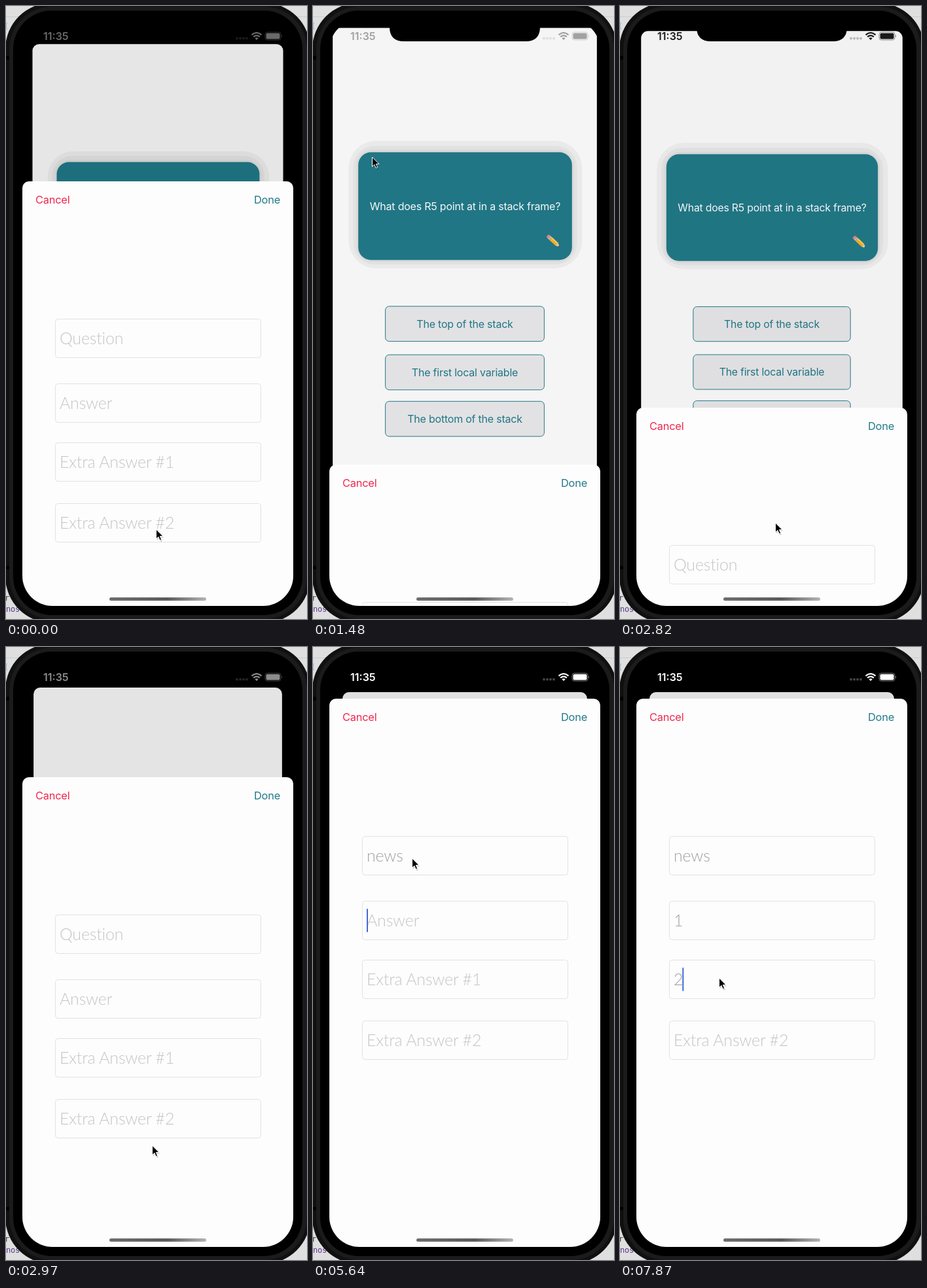
Animation of 460x937 px, one loop 8000 ms. Source, as an HTML page:

```html
<!DOCTYPE html>
<html lang="en">
<head>
<meta charset="utf-8">
<title>Flashcard form</title>
<style>
  html, body { margin: 0; width: 100%; height: 100%; overflow: hidden; background: #dfdfdf; }
  svg { display: block; width: 460px; height: 937px; }
  text { font: 16.4px Inter, "Liberation Sans", sans-serif; letter-spacing: -.22px; }
  .mid { text-anchor: middle; }
  .teal { fill: #217a89; }
  .option { fill: #e9e9eb; stroke: #217a89; }
  .box { fill: #fdfdfd; stroke: #e2e2e2; }
  .entry { font: 300 25px Lato, "Open Sans", sans-serif; letter-spacing: -.2px; }
  .code { font: 12px "DejaVu Sans Mono", monospace; }
  #clock { font-weight: 600; font-size: 16px; letter-spacing: 0; }
</style>
</head>
<body>
<svg viewBox="0 0 460 937">
  <defs>
    <clipPath id="screen"><rect x="25" y="21" width="414" height="896" rx="46"/></clipPath>
    <linearGradient id="bar">
      <stop offset="0" stop-color="#6e6e6e"/><stop offset=".6" stop-color="#5c5c5c"/><stop offset="1" stop-color="#b4b4b4"/>
    </linearGradient>
  </defs>

  <!-- desktop and device body -->
  <rect width="460" height="937" fill="#dfdfdf"/>
  <path d="M0 16.5H460" stroke="#cdcdcd"/>
  <text class="code" x="-3" y="35" fill="#8fb4dc">(</text>
  <text class="code" x="-2" y="909" fill="#444">r</text>
  <text class="code" x="0" y="926" fill="#5b3a8c">nos</text>
  <rect x="-1" y="-5" width="466" height="948" rx="71" fill="#101010"/>
  <rect x="5" y="1" width="455" height="936" rx="65" fill="#1b1b1b"/>
  <path d="M0 76h5v6H0zM0 856h5v5H0z"/>
  <rect x="11" y="7" width="442" height="924" rx="59"/>

  <g clip-path="url(#screen)">
    <g id="home">
      <rect x="25" y="21" width="414" height="896" rx="11" fill="#fdfdfd"/>
      <rect x="50" y="198" width="366" height="200" rx="43" fill="#f2f2f2"/>
      <rect x="57" y="206" width="351" height="186" rx="33" fill="#e9e9e9"/>
      <rect x="62" y="212" width="341" height="176" rx="25" fill="#e1e1e1"/>
      <rect class="teal" x="65" y="216" width="335" height="169" rx="20"/>
      <text class="mid" x="232.5" y="307" fill="#fff">What does R5 point at in a stack frame?</text>
      <g transform="translate(371 355.5) rotate(43)">
        <rect x="-13" y="-3" width="6" height="6" rx="2" fill="#ee8292"/>
        <rect x="-9" y="-3" width="3" height="6" fill="#b9bcc0"/>
        <rect x="-6" y="-3" width="13" height="6" fill="#f6b32c"/>
        <rect x="-6" y="-3" width="13" height="2" fill="#ffd355"/>
        <path d="M7-3 13 0 7 3z" fill="#f1cfa0"/>
        <path d="M11-1 13.500 0 11 1z" fill="#333"/>
      </g>
      <g id="options"></g>
      <path id="plus" d="M218 799.500H246M232 786V813" stroke="#217a89" stroke-width="5"/>
      <rect id="dim" x="25" y="21" width="414" height="896" rx="11"/>
    </g>
    <g id="sheet">
      <rect x="25" width="414" height="960" rx="10" fill="#fdfdfd"/>
      <text id="cancel" x="45" y="34" fill="#f0284f">Cancel</text>
      <text class="teal" x="419" y="34" text-anchor="end">Done</text>
      <g id="fields"></g>
      <rect id="caret" width="2" height="36" rx="1" fill="#4468d8"/>
    </g>
    <rect x="158" y="904" width="148" height="5" rx="2.500" fill="url(#bar)"/>
  </g>

  <path d="M109 20Q117 21 117 29V32Q117 54 139 54H325Q347 54 347 32V29Q347 21 355 20z"/>
  <g id="status">
    <text id="clock" x="57" y="52">11:35</text>
    <g opacity=".26">
      <circle cx="353" cy="49.500" r="2"/><circle cx="358" cy="49.500" r="2"/>
      <circle cx="363" cy="49.500" r="2"/><circle cx="368" cy="49.500" r="2"/>
    </g>
    <g fill="none" stroke="currentColor" stroke-width="2.300">
      <path d="M375.500 44.200Q383 37.500 390.500 44.200M378.200 47.200Q383 43 387.800 47.200"/>
    </g>
    <path d="M380.300 49.300Q383 47 385.700 49.300L383 52z"/>
    <rect x="396" y="40" width="24" height="12" rx="3.500" fill="none" stroke="currentColor" opacity=".45"/>
    <rect x="397.500" y="41.500" width="21" height="9" rx="2"/>
    <path d="M421 44q2 2 0 4z" opacity=".5"/>
  </g>

  <g id="cursor">
    <path d="M1.500 3V17.500L5 14.500 7.500 20 10 19 7.800 13.500H12.500z" opacity=".18"/>
    <path d="M.5 1V15.500L3.900 12.400 6.200 17.700 8.600 16.700 6.400 11.500H11z" stroke="#fff"/>
  </g>
</svg>

<script>
  const LOOP = 8000, STEP = 4000 / 27;
  const $ = id => document.getElementById(id);

  function add(parent, tag, attrs, text = '') {
    const el = document.createElementNS('http://www.w3.org/2000/svg', tag);
    for (const name in attrs) el.setAttribute(name, attrs[name]);
    el.textContent = text;
    return parent.appendChild(el);
  }

  [['The top of the stack', 457], ['The first local variable', 533], ['The bottom of the stack', 606]]
    .forEach(([label, y]) => {
      add($('options'), 'rect', { class: 'option', x: 107.5, y: y + .5, width: 249, height: 55, rx: 6 });
      add($('options'), 'text', { class: 'mid teal', x: 232, y: y + 34 }, label);
    });

  // typed: [step, value] pairs
  const fields = [
    { hint: 'Question', y: 210, typed: [[32, 'n'], [33, 'ne'], [34, 'new'], [36, 'news']] },
    { hint: 'Answer', y: 309, typed: [[45, '1']] },
    { hint: 'Extra Answer #1', y: 399, typed: [[53, '2']] },
    { hint: 'Extra Answer #2', y: 492, typed: [] }
  ];
  for (const f of fields) {
    add($('fields'), 'rect', { class: 'box', x: 75.5, y: f.y + .5, width: 314, height: 59, rx: 4 });
    f.text = add($('fields'), 'text', { class: 'entry', x: 82, y: f.y + 39 });
  }

  // [step, field, opacity]
  const carets = [[0, 0, 0], [29, 0, 1], [37, 0, 0], [38, 1, 1], [42, 1, .5], [43, 1, 0],
    [44, 1, .4], [45, 1, 1], [49, 1, .5], [50, 1, 0], [53, 2, 1]];

  // [step, x, y]
  const path = [[0, 229, 799], [1, 224, 760], [2, 190, 520], [3, 145, 270], [4, 123, 158],
    [6, 74, 108], [8, 66, 104], [9, 68, 110], [10, 90, 230], [12, 205, 690], [13, 234, 782],
    [14, 239, 792], [18, 239, 792], [19, 237, 789], [20, 223, 761], [21, 195, 600],
    [22, 165, 400], [23, 155, 331], [25, 153, 324], [27, 151, 322], [49, 151, 322],
    [52, 151, 495], [53, 151, 505]];

  const latest = (list, k) => list.filter(item => item[0] <= k).pop();

  function along(k) {
    const a = latest(path, k), b = path[path.indexOf(a) + 1] || a;
    const f = a === b ? 0 : (k - a[0]) / (b[0] - a[0]);
    return [1, 2].map(i => Math.round(a[i] + (b[i] - a[i]) * f));
  }

  function spring(ms) {
    const u = Math.max(0, ms) * .0146;
    return 1 - (1 + u) * Math.exp(-u);
  }

  function fade(ms) {
    const x = Math.min(1, Math.max(0, ms / 440));
    return x * x * (3 - 2 * x);
  }

  function presented(t, curve) {
    if (t < 1300) return curve(t + 194);
    if (t < 2700) return 1 - curve(t - 1300);
    return curve(t - 2728);
  }

  function draw(now) {
    const k = Math.floor((now % LOOP + 1) / STEP), t = k * STEP;
    const p = presented(t, spring), light = Math.round(255 * presented(t, fade));

    $('home').setAttribute('transform',
      `translate(232 ${21 + 48 * p}) scale(${1 - .0966 * p}) translate(-232 -21)`);
    $('dim').setAttribute('opacity', .115 * p);
    $('sheet').setAttribute('transform', `translate(0 ${Math.round(917 - 838 * p)})`);
    $('status').style.color = $('status').style.fill = `rgb(${light},${light},${light})`;
    $('cancel').setAttribute('opacity', { 7: .5, 8: .2, 9: .5 }[k] || 1);
    $('plus').setAttribute('opacity', { 16: .5, 17: .2, 18: .5 }[k] || 1);

    for (const f of fields) {
      const entry = latest(f.typed, k);
      f.text.textContent = entry ? entry[1] : f.hint;
      f.text.setAttribute('fill', entry ? '#a2a2a2' : '#c5c5c7');
      f.filled = Boolean(entry);
    }

    const [, index, alpha] = latest(carets, k), focus = fields[index];
    $('caret').setAttribute('x', 82 + (focus.filled ? focus.text.getComputedTextLength() - 1 : 0));
    $('caret').setAttribute('y', focus.y + 12);
    $('caret').setAttribute('opacity', alpha);

    $('cursor').setAttribute('transform', `translate(${along(k)})`);
  }

  function tick() {
    draw(performance.now());
    requestAnimationFrame(tick);
  }
  tick();
</script>
</body>
</html>
```
